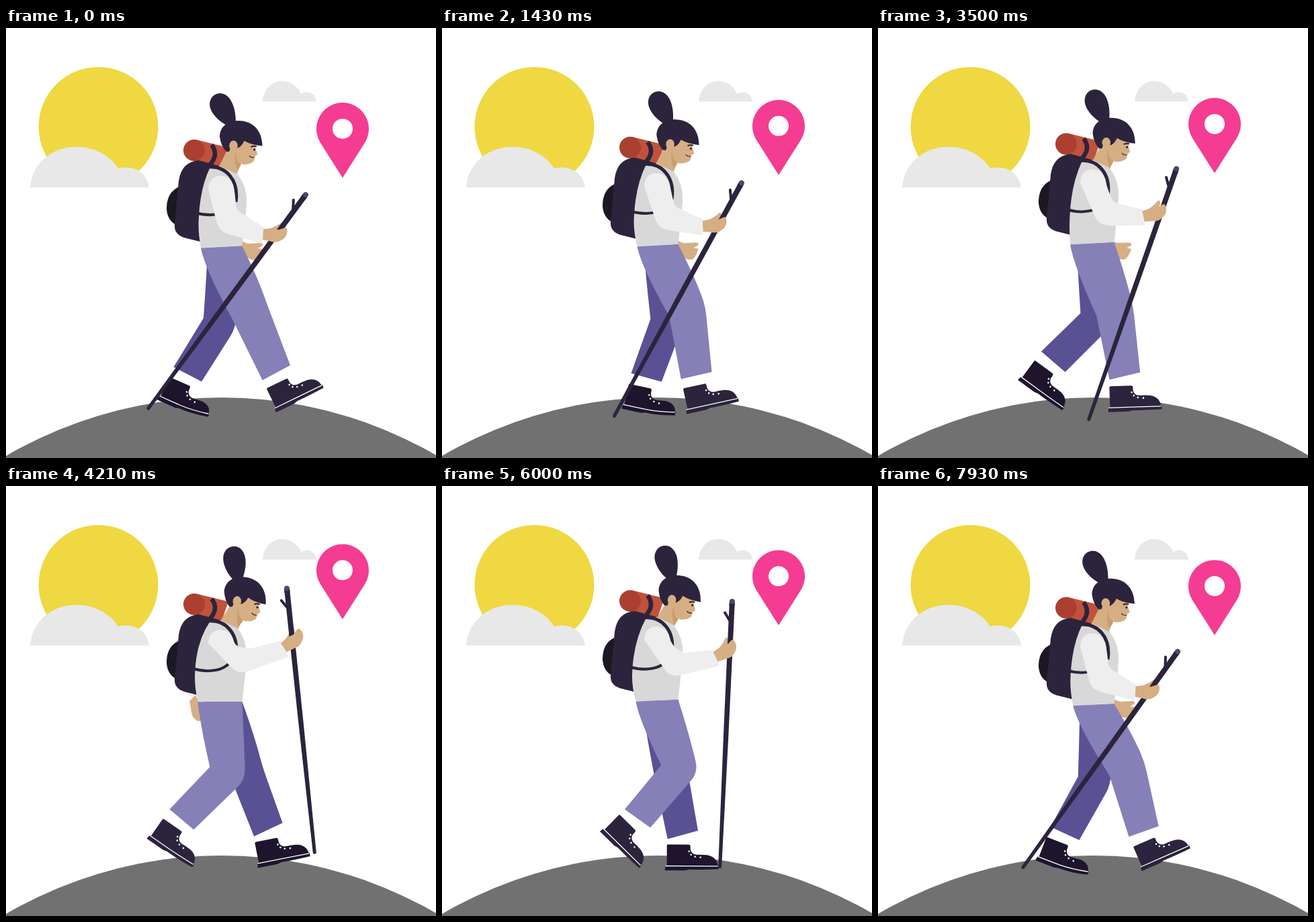
Recreate the animation shown at these times as an HTML page. Size 640 px wide and 640 px high, loop 8000 ms.

```html
<!DOCTYPE html>
<html lang="en">
<head>
<meta charset="utf-8">
<title>Hiker</title>
<style>
  html, body { margin: 0; width: 100%; height: 100%; overflow: hidden; background: #fff; }
  svg { display: block; width: 100%; height: 100%; }
</style>
</head>
<body>
<svg viewBox="0 0 640 640">
  <defs>
    <g id="laces" fill="#fff">
      <circle cx="35" cy="-22.5" r="1.3"/><circle cx="38" cy="-17.5" r="1.3"/>
      <circle cx="44" cy="-14.5" r="1.3"/><circle cx="52" cy="-13.5" r="1.3"/>
    </g>
  </defs>

  <circle cx="137.5" cy="147" r="89" fill="#efd842"/>
  <g fill="#e8e8e8">
    <path d="M36 237.5C38 203 67 177 104 177C133 177 155 190 167 209C188 203 211 215 213 237.5Z"/>
    <path d="M382 109.5C383 92 395 79 411 79C424 79 435 87 439 98C449 92 461 97 462 109.5Z"/>
  </g>
  <circle cx="321" cy="1186" r="636" fill="#717171"/>

  <g id="pin">
    <path d="M501 223L468 171A39 39 0 1 1 534 171Z" fill="#f43c92"/>
    <circle cx="501" cy="150" r="15" fill="#fff"/>
  </g>

  <path id="farSleeve" fill="none" stroke="#eee" stroke-width="20"/>
  <path id="farHand" fill="#d6ae83" d="M-2-4L10 1L29 0Q35 2 30 5L25 8L32 9Q30 18 24 25Q14 27 8 20L-4 8Z"/>

  <g id="farBoot"></g>
  <path id="farLeg" fill="#595194"/>
  <g id="nearBoot"></g>

  <g id="pack">
    <path d="M284 166.500L331 178L321 207L280 198Z" fill="#c0523c"/>
    <circle cx="280" cy="182" r="16" fill="#ab4031"/>
    <path d="M306 174Q317 188 304 203" fill="none" stroke="#2c243c" stroke-width="6.500"/>
    <path d="M258 236Q239 244 239 269Q240 286 253 293Z" fill="#1b1824"/>
    <path d="M251 293L257 228Q261 199 287 197L320 206L304 240L293 319L265 312Q250 307 251 293Z" fill="#2c243c"/>
  </g>

  <path class="head" fill="#d6ae83" d="M329 182L348 180L348 200Q346 214 342 222L316 208Z"/>
  <path class="head" fill="#c99c6c" d="M341 184L350 203L345 212Q339 202 341 184Z"/>
  <path id="torso" fill="#d8d8d8"/>
  <path id="nearLeg" fill="#8680b8"/>
  <g fill="none" stroke="#2c243c">
    <path id="strap" d="M300 207C327 204 347 226 342 259" stroke-width="5"/>
    <path id="belt" d="M282 275Q300 280 315 277Q327 275 335 267" stroke-width="4"/>
  </g>

  <g class="head">
    <path id="pony" fill="#2c243c" d="M0 2C-8-4-17-20-17-34C-17-46-9-53-1-53C9-53 16-45 16-32C16-18 9-4 5 2Z"/>
    <path d="M344 176L354 166L371 172L372 181L374.500 188L371 190.500L369 198Q363 204 352 203Q344 201 342 190Z" fill="#d6ae83"/>
    <path d="M318 162C318 146 331 138 346 138C366 138 381 151 381.500 175.500Q365 174 354.500 168Q350 178 343 179L334 184H328Q320 176 318 162Z" fill="#2c243c"/>
    <ellipse cx="338.500" cy="175" rx="6.300" ry="7.500" fill="#d6ae83"/>
    <path d="M334 179L331 187H343L344 178Z" fill="#d6ae83"/>
    <path d="M364.500 177Q368 175 373 176" fill="none" stroke="#2c243c" stroke-width="2"/>
    <circle cx="369.500" cy="181" r="1.600" fill="#2c243c"/>
    <path d="M362 190Q365 193.500 369.500 192.500" fill="none" stroke="#2c243c" stroke-width="1.200"/>
  </g>

  <path id="sleeve" fill="#eee"/>
  <path class="hand" fill="#d6ae83" d="M8-6Q20-10 27-15.500Q31-14 28-9L20 2Z"/>
  <g id="stick">
    <path d="M-4 0L-3.700 200L-2.500 396Q0 399 2.500 396L3.700 200L4 0Z" fill="#2c243c"/>
    <path d="M0 32L-10 17" stroke="#2c243c" stroke-width="4" stroke-linecap="round"/>
    <circle r="4" fill="#4d466f"/>
    <path d="M-4 2V6H4V2Q0 6-4 2Z" fill="#2c243c"/>
  </g>
  <path class="hand" fill="#d6ae83" d="M0-6L12-7L23-5L33-8Q37-6 35 1Q33 8 28 10Q20 16 10 12L-1 10Z"/>
</svg>

<script>
const PERIOD = 1600;
const { PI, sin, cos, acos, atan2, hypot, min, max } = Math;
const $ = id => document.getElementById(id);
const set = (el, name, value) => el.setAttribute(name, value);
const clamp = x => min(1, max(0, x));
const smooth = x => (x = clamp(x)) * x * (3 - 2 * x);
const mix = (a, b, k) => [a[0] + (b[0] - a[0]) * k, a[1] + (b[1] - a[1]) * k];
const polar = (c, a, r) => [c[0] + r * cos(a), c[1] + r * sin(a)];
const p = a => a[0].toFixed(2) + ' ' + a[1].toFixed(2);
const heads = document.querySelectorAll('.head');
const hands = document.querySelectorAll('.hand');

// Key poses of each foot: phase, heel x, heel y, tilt. The legs follow from these.
const NEAR_STEP = [
  [0, 400, 566.5, -26], [.1, 376, 564, -10], [.21, 334, 566, 0],
  [.42, 221, 557, 19], [.55, 202, 537, 30], [.634, 214, 520, 35],
  [.747, 238, 510, 45], [.893, 363, 568.5, -12], [.955, 390.5, 567.5, -23.5]
];
const FAR_STEP = [
  [0, 228, 548, 24], [.184, 212, 520, 36], [.297, 238, 510, 45],
  [.42, 366, 553.5, 0], [.53, 387, 562, -20], [.634, 374, 562.5, -11],
  [.747, 334, 566, 0], [.893, 270, 561, 12], [.955, 238, 552, 21]
];

// Periodic cubic Hermite through the key poses.
function sample(rows, t) {
  const n = rows.length;
  const row = i => rows[(i + n) % n];
  const time = i => row(i)[0] + Math.floor(i / n);
  let i = n - 1;
  while (rows[i][0] > t) i--;
  const h = time(i + 1) - time(i), u = (t - time(i)) / h, v = 1 - u;
  const slope = (j, c) => {
    const a = time(j) - time(j - 1), b = time(j + 1) - time(j);
    const da = (row(j)[c] - row(j - 1)[c]) / a, db = (row(j + 1)[c] - row(j)[c]) / b;
    return (da * b + db * a) / (a + b);
  };
  return [1, 2, 3].map(c =>
    row(i)[c] * (1 + 2 * u) * v * v + row(i + 1)[c] * u * u * (3 - 2 * u)
      + h * u * v * (slope(i, c) * v - slope(i + 1, c) * u));
}

// Trouser leg from the waist to the ankle; the knee bends forwards.
function legPath(w1, w2, hip, [x, y, tilt], thigh, shin, kneeWidth) {
  const a = tilt * PI / 180;
  const ankle = polar(polar([x, y], a, 25.5), a - PI / 2, 47);
  const dx = ankle[0] - hip[0], dy = ankle[1] - hip[1], d = hypot(dx, dy);
  const bend = acos(min(1, (thigh * thigh + d * d - shin * shin) / (2 * thigh * d)));
  const thighDir = atan2(dy, dx) - bend;
  const knee = polar(hip, thighDir, thigh);
  const shinDir = atan2(ankle[1] - knee[1], ankle[0] - knee[0]);

  const across = (thighDir + shinDir - PI) / 2, cuff = shinDir - PI / 2 - .08;
  const back = polar(knee, across, -kneeWidth), front = polar(knee, across, kneeWidth);
  const hem1 = polar(ankle, cuff, -23.5), hem2 = polar(ankle, cuff, 23.5);
  const c1 = [w1[0] + (back[0] - w1[0]) * .12, w1[1] + (back[1] - w1[1]) * .28];
  const c2 = [w2[0] + (front[0] - w2[0]) * .58, w2[1] + (front[1] - w2[1]) * .5];
  return `M${p(w1)}Q${p(c1)} ${p(back)}L${p(hem1)}L${p(hem2)}L${p(mix(front, hem2, .15))}` +
    `Q${p(front)} ${p(mix(front, c2, .3))}Q${p(c2)} ${p(w2)}Z`;
}

function makeBoot(g, color) {
  g.innerHTML = `<path fill="${color}"/><path fill="${color}"/>` +
    '<path fill="none" stroke="#fff" stroke-width="1.3"/><use href="#laces"/>';
}

// The toe flattens on the ground while the heel lifts.
function drawBoot(g, [x, y, tilt]) {
  const e = -6 * sin(PI * clamp(tilt / 38)), m = e * .1;
  const [upper, sole, line] = g.children;
  set(g, 'transform', `translate(${x} ${y}) rotate(${tilt})`);
  set(upper, 'd', `M2-31Q2-32.500 4-32.500H35Q37.500-32.500 37-26Q38-18.500 46-17.500Q54-18 62 ${-17 + e * .4}Q77 ${-14 + e * .7} 78 ${e}Q55 ${m} 35 0H2Z`);
  set(sole, 'd', `M0-1H35Q55 ${m - 1} 79 ${e - 1}V${e + 4}Q55 ${m + 5} 35 4.500L29 6H-1Z`);
  set(line, 'd', `M0-.500H35Q55 ${m - .5} 78 ${e - .5}`);
}

function sleevePath(out, inn, c1, c2, dy) {
  const s = [301, 240 + dy];
  return `M${p(s)}Q302 ${220 + dy} 320 ${220 + dy}Q333 ${221 + dy} 338 ${234 + dy}` +
    `Q341 ${245 + dy * .6} ${p(mix(inn, [338, 234 + dy], .15))}Q${p(inn)} ${p(mix(inn, c1, .2))}` +
    `L${p(c1)}L${p(c2)}L${p(mix(out, c2, .25))}Q${p(out)} ${p(mix(out, s, .2))}Z`;
}

function draw(t) {
  const wave = shift => cos(2 * PI * (t - shift));
  const dy = 5.5 * cos(4 * PI * t) - 5.5;   // bob, twice per stride
  const nod = 3.1 - 3.1 * wave(.035);       // head leans once per stride
  // Arm and stick: 0 is back and low, 1 is forward and high.
  const swing = t < .655 ? smooth((t + .015) / .465) : 1 - smooth((t - .655) / .33);
  const far = swing ** 3;

  set($('pin'), 'transform', `translate(0 ${14 * wave(.02) - 14})`);
  set($('pack'), 'transform', `translate(0 ${dy})`);
  set($('strap'), 'transform', `translate(0 ${dy})`);
  set($('belt'), 'transform', `translate(${-nod / 2} ${dy * .5})`);
  for (const el of heads)
    set(el, 'transform', `translate(${nod} ${dy * .45}) rotate(${nod} 346 172)`);
  set($('pony'), 'transform', `translate(336 146) rotate(${2.6 * nod - 27})`);

  const w1 = [286.5 + 4 * wave(.92), 325.2 + .4 * dy + 2.3 * wave(0)];
  const w2 = [351.5, 324.6 + .6 * dy];
  const hip = mix(w1, w2, .5), side = 287 - nod;
  set($('torso'), 'd', `M304 ${207 + dy}L320 ${206 + dy}L345 ${218 + dy}Q360 ${238 + dy} 358 ${264 + dy}` +
    `Q356 ${290 + dy} ${p(w2)}L${p(w1)}Q${side - 1.5} ${w1[1] - 25} ${side} ${w1[1] - 45}` +
    `Q${side + 2} ${w1[1] - 90} 304 ${207 + dy}Z`);

  const near = sample(NEAR_STEP, t), away = sample(FAR_STEP, t);
  set($('nearLeg'), 'd', legPath(w1, w2, hip, near, 107, 97, 28));
  set($('farLeg'), 'd', legPath([w1[0] + 10, w1[1]], w2, hip, away, 113, 90, 25));
  drawBoot($('nearBoot'), near);
  drawBoot($('farBoot'), away);

  const fx = 350 - 69 * far, fy = 320 - 4 * swing;
  set($('farSleeve'), 'd', `M320 ${240 + dy}L${fx - 8} ${fy - 4}`);
  set($('farHand'), 'transform', `translate(${fx} ${fy}) rotate(${35 * far})`);

  const out = mix([317, 303], [346, 281], swing), inn = mix([343, 271], [360, 243], swing);
  const c1 = mix([384, 297], [408, 230.5], swing), c2 = mix([381, 321], [421, 254], swing);
  set($('sleeve'), 'd', sleevePath(out, inn, c1, c2, dy));
  for (const el of hands)
    set(el, 'transform', `translate(${p(mix(c1, c2, .35))}) rotate(${-37 * swing})`);

  set($('stick'), 'transform',
    `translate(${446 - 28 * far} ${248.5 - 96 * swing}) rotate(${36.5 - 42.5 * swing})`);
}

makeBoot($('nearBoot'), '#2c243c');
makeBoot($('farBoot'), '#1e152d');

const start = performance.now();
function frame() {
  draw(((performance.now() - start) % PERIOD) / PERIOD);
  requestAnimationFrame(frame);
}
frame();
</script>
</body>
</html>
```
